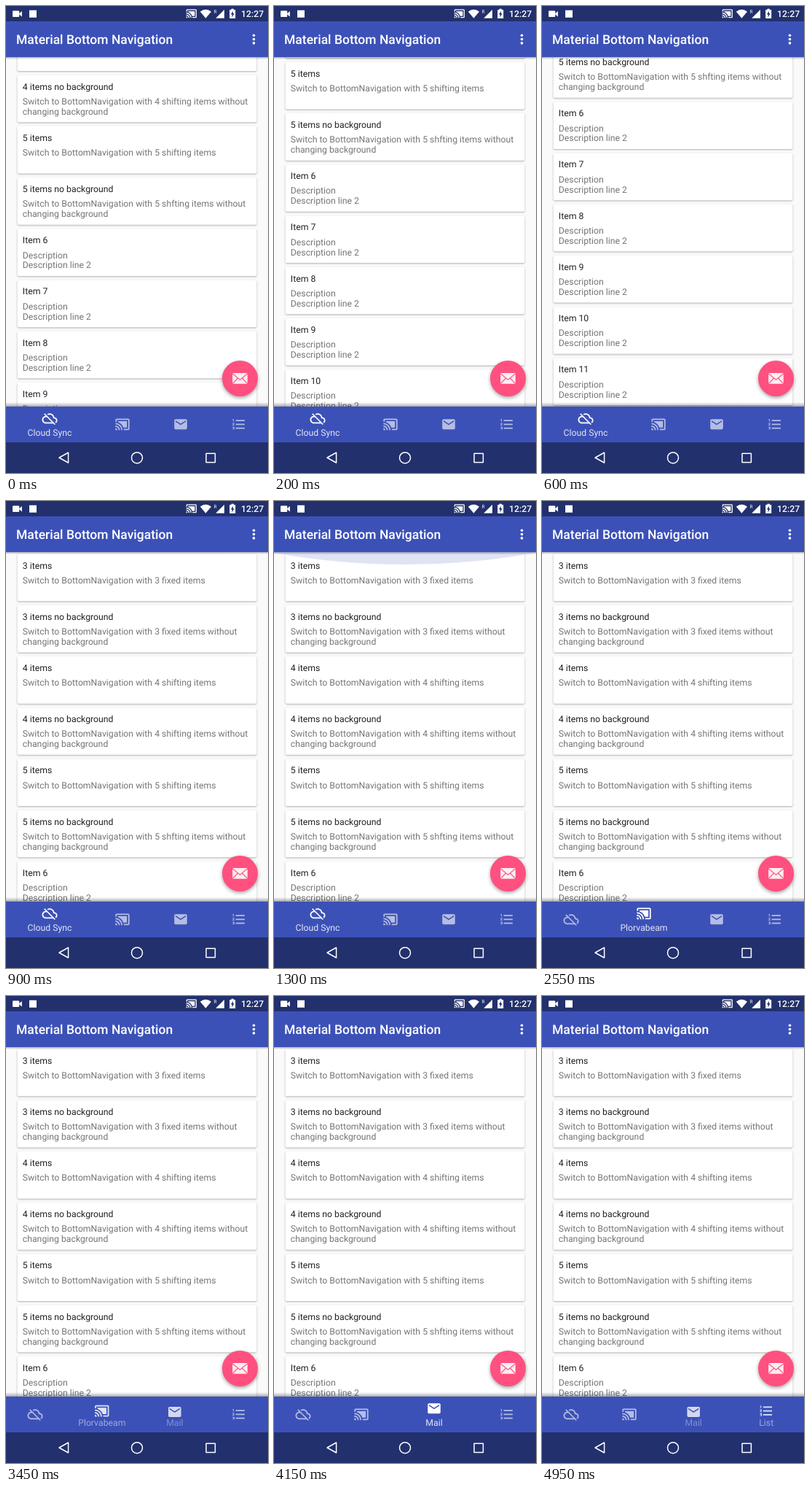
Animation of 360 by 640 pixels, one loop 5000 ms. Source, as an HTML page:

```html
<!DOCTYPE html>
<html lang="en">
<head>
<meta charset="utf-8">
<title>Material Bottom Navigation</title>
<style>
html, body { margin: 0; width: 100%; height: 100%; overflow: hidden; background: #fafafa; }
svg { display: block; width: 100vw; height: 100vh; }
text { font: 12.26px Roboto, sans-serif; text-rendering: geometricPrecision; }
.head { fill: #212121; }
.desc { fill: #757575; }
.bar { fill: #3c51b7; }
.dark { fill: #22306d; }
.title { font-size: 17.5px; font-weight: 500; fill: #fff; }
.clock { font-weight: 500; fill: #fff; }
.label { fill: #fff; text-anchor: middle; }
.card { fill: #fff; filter: drop-shadow(0 1px 0.9px rgba(0,0,0,.3)); }
</style>
</head>
<body>
<svg viewBox="0 0 360 640">
  <defs>
    <linearGradient id="down" x2="0" y2="1">
      <stop offset="0" stop-opacity=".24"/><stop offset="1" stop-opacity="0"/>
    </linearGradient>
    <linearGradient id="up" x2="0" y2="1">
      <stop offset="0" stop-opacity="0"/><stop offset="1" stop-opacity=".32"/>
    </linearGradient>
    <path id="cast" d="M1 18v3h3c0-1.66-1.34-3-3-3zm0-4v2c2.76 0 5 2.24 5 5h2c0-3.87-3.13-7-7-7zm18-7H5v1.63c3.96 1.28 7.09 4.41 8.37 8.37H19V7zM1 10v2c4.97 0 9 4.03 9 9h2c0-6.08-4.93-11-11-11zm20-7H3c-1.1 0-2 .9-2 2v3h2V5h18v14h-7v2h7c1.1 0 2-.9 2-2V5c0-1.1-.9-2-2-2z"/>
    <path id="cloud" d="M19.35 10.04C18.67 6.59 15.64 4 12 4c-1.48 0-2.85.43-4.01 1.17l1.46 1.46C10.21 6.23 11.08 6 12 6c3.04 0 5.5 2.46 5.5 5.5v.5H19c1.66 0 3 1.34 3 3 0 1.13-.64 2.11-1.56 2.62l1.45 1.45C23.16 18.16 24 16.68 24 15c0-2.64-2.05-4.78-4.65-4.96zM3 5.27l2.75 2.74C2.56 8.15 0 10.77 0 14c0 3.31 2.69 6 6 6h11.73l2 2L21 20.73 4.27 4 3 5.27zM7.73 10l8 8H6c-2.21 0-4-1.79-4-4s1.79-4 4-4h1.73z"/>
    <path id="mail" d="M20 4H4c-1.1 0-2 .9-2 2v12c0 1.1.9 2 2 2h16c1.1 0 2-.9 2-2V6c0-1.1-.9-2-2-2zm0 4l-8 5-8-5V6l8 5 8-5v2z"/>
    <path id="list" d="M2 17h2v.5H3v1h1v.5H2v1h3v-4H2v1zm1-9h1V4H2v1h1v3zm-1 3h1.8L2 13.1v.9h3v-1H3.2L5 10.9V10H2v1zm5-6v2h14V5H7zm0 14h14v-2H7v2zm0-6h14v-2H7v2z"/>
  </defs>

  <rect width="360" height="640" fill="#fafafa"/>
  <g id="cards"></g>
  <path id="glow" fill="#3c51b7"/>

  <!-- floating button -->
  <circle cx="321.5" cy="510.5" r="24.5" fill="#ff5080" style="filter:drop-shadow(0 2px 2.5px rgba(0,0,0,.36))"/>
  <rect x="311.2" y="503" width="20.6" height="14.8" rx="1" fill="#fdeef2"/>
  <path d="M311.2 503.8l10.3 8.4 10.3-8.4M311.4 517.4l7.2-7.4M331.6 517.4l-7.2-7.4" fill="none" stroke="#ff5080" stroke-width="1.1"/>

  <!-- top bars -->
  <rect y="70" width="360" height="3.5" fill="url(#down)"/>
  <rect class="bar" y="21" width="360" height="49.1"/>
  <rect class="dark" width="360" height="21"/>
  <text class="title" x="14" y="52">Material Bottom Navigation</text>
  <g fill="#fff">
    <circle cx="340.5" cy="40.3" r="1.8"/><circle cx="340.5" cy="45.6" r="1.8"/><circle cx="340.5" cy="50.9" r="1.8"/>
    <rect x="9" y="6.5" width="9.2" height="8.6" rx="1"/>
    <path d="M17.5 10.8l4.4-3.9v7.8z"/>
    <rect x="32" y="5.8" width="10" height="10"/>
    <use href="#cast" transform="translate(247 2.6) scale(.65)"/>
    <path d="M266.8 7.8Q274.4 1.8 282 7.8L274.4 16.8z"/>
    <path d="M300 5v11.8h-11.8z"/>
    <text x="285.4" y="9.6" style="font-size:6.5px">R</text>
    <path d="M309.6 5.2v-1.4h3.2v1.4h2.4v11.9h-8v-11.9z"/>
    <path class="dark" d="M311.9 6.9v3.3h1.7l-3 5.3v-3.9h-1.7z"/>
    <text class="clock" x="323" y="15">12:27</text>
  </g>

  <!-- bottom bars -->
  <rect y="543" width="360" height="6" fill="url(#up)"/>
  <rect class="bar" y="548.9" width="360" height="49.5"/>
  <rect class="dark" y="598" width="360" height="42"/>
  <g id="tabs"></g>
  <g fill="none" stroke="#fff" stroke-width="1.5" stroke-linejoin="round">
    <path d="M85.6 612v14L73 619z"/>
    <circle cx="180" cy="619.2" r="7.5"/>
    <rect x="275" y="613.2" width="12.4" height="12.4"/>
  </g>
</svg>
<script>
const LOOP = 5000, STEP = 50, PITCH = 70.22;
const $ = id => document.getElementById(id);
const clamp = v => Math.min(1, Math.max(0, v));
const span = (t, a, b) => clamp((t - a) / (b - a));
const smooth = u => u * u * (3 - 2 * u);

function add(parent, tag, attrs, text) {
  const node = document.createElementNS("http://www.w3.org/2000/svg", tag);
  for (const k in attrs) node.setAttribute(k, attrs[k]);
  if (text) node.textContent = text;
  return parent.appendChild(node);
}

function addCard(i, head, lines) {
  const y = 72.6 + PITCH * i;
  add($("cards"), "rect", { class: "card", x: 15.6, y, width: 328.8, height: 64.6, rx: 1.8 });
  add($("cards"), "text", { class: "head", x: 22.8, y: y + 19.9 }, head);
  lines.forEach((s, n) =>
    add($("cards"), "text", { class: "desc", x: 22.8, y: y + 40.2 + 13.9 * n }, s));
}

["3 fixed", "4 shifting", "5 shifting"].forEach((kind, n) => {
  const go = "Switch to BottomNavigation with ";
  const head = kind[0] + " items";
  addCard(2 * n, head, [go + kind + " items"]);
  const plain = n === 2 ? "5 shfting" : kind;
  addCard(2 * n + 1, head + " no background",
    [go + plain + " items without", "changing background"]);
});
for (let i = 6; i < 14; i++) addCard(i, "Item " + i, ["Description", "Description line 2"]);

const tabs = [["cloud", "Cloud Sync"], ["cast", "Plorvabeam"], ["mail", "Mail"], ["list", "List"]]
  .map(([icon, name]) => ({
    icon: add($("tabs"), "use", { href: "#" + icon, fill: "#fff" }),
    label: add($("tabs"), "text", { class: "label", y: 589.2 }, name)
  }));
const taps = [1880, 3368, 4832];

function scrollAt(t) {
  if (t < 600) return 362.6 - 174 * Math.pow(1 - t / 600, 1.74);
  return 362.6 * (1 - smooth(span(t, 600, 900)));
}

function draw(t) {
  $("cards").setAttribute("transform", `translate(0 ${-scrollAt(t)})`);

  const pull = span(t, 880, 1150) * (1 - span(t, 1650, 2150));
  $("glow").setAttribute("d", `M0 70H360V71Q180 ${71 + 32 * pull} 0 71z`);
  $("glow").setAttribute("opacity", 0.16 * pull);

  const pos = taps.reduce((sum, s) => sum + span(t, s, s + 200), 0);
  let left = 0;
  tabs.forEach(({ icon, label }, i) => {
    const on = Math.max(0, 1 - Math.abs(pos - i));
    const width = 80 + 40 * on, x = left + width / 2;
    left += width;
    icon.setAttribute("transform",
      `translate(${x - 10.5} ${573.3 - 8 * on - 10.5}) scale(.876)`);
    icon.setAttribute("opacity", 0.62 + 0.38 * on);
    label.setAttribute("x", x);
    label.setAttribute("opacity", 0.85 * on);
  });
}

const start = performance.now();
function tick() {
  const t = (performance.now() - start) % LOOP;
  draw(Math.floor(t / STEP + 0.01) * STEP % LOOP);
  requestAnimationFrame(tick);
}
tick();
</script>
</body>
</html>
```
